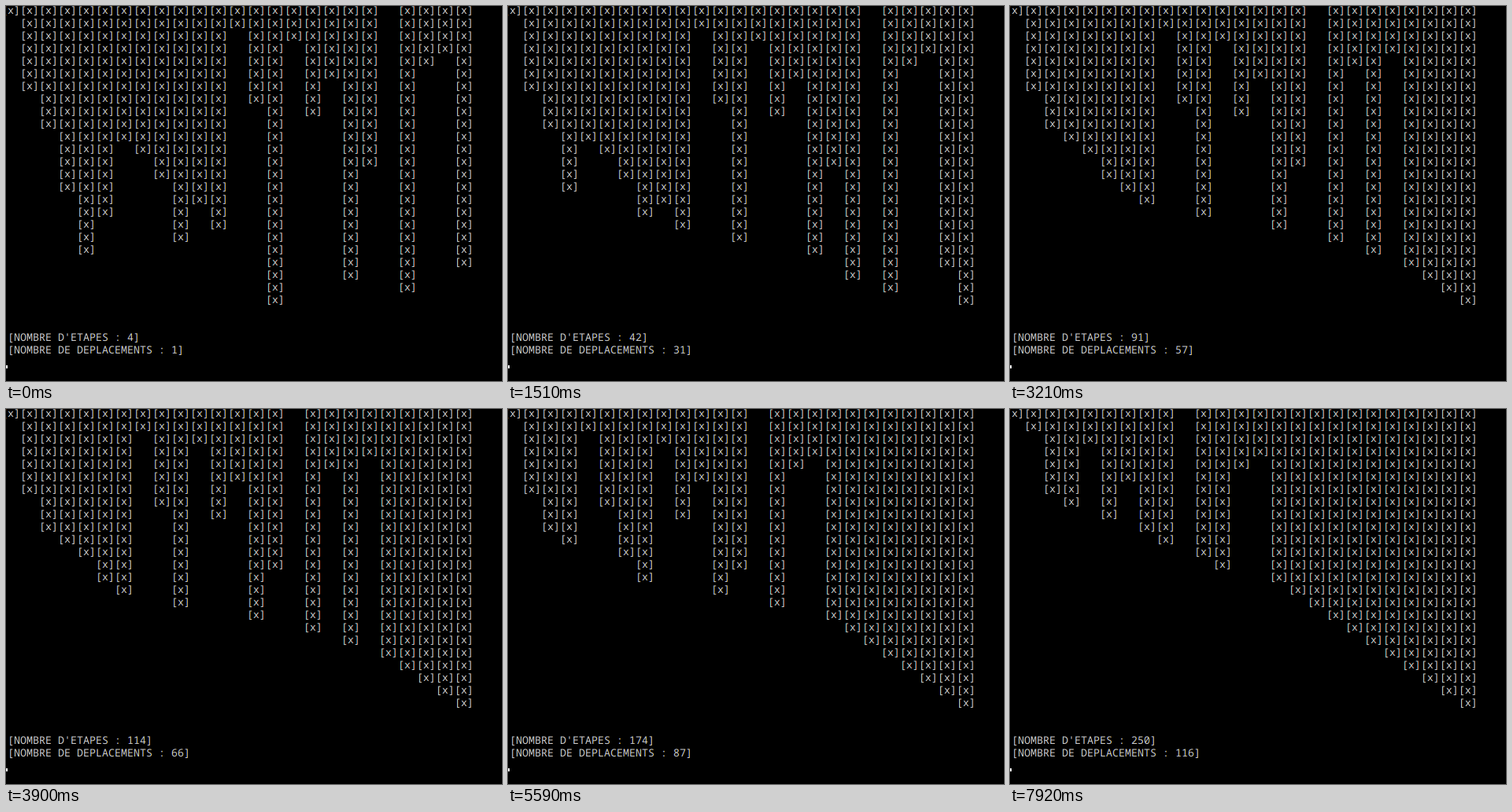
Recreate the animation shown at these times as an HTML page with a canvas. Size 630x477 px, loop 8000 ms.

```html
<!DOCTYPE html>
<html lang="fr">
<head>
<meta charset="utf-8">
<style>
html, body { margin: 0; width: 100%; height: 100%; overflow: hidden; background: #000; }
canvas { display: block; }
</style>
</head>
<body>
<canvas id="stage" width="630" height="477"></canvas>
<script>
const ctx = document.getElementById('stage').getContext('2d', { alpha: false });
const LOOP = 8000, LEFT = -6, LINE = 16, BASELINE = 10;

const start = [1, 7, 10, 20, 15, 17, 11, 12, 14, 19, 16, 18, 2,
               8, 24, 3, 9, 6, 22, 13, 0, 23, 5, 4, 21];

// Pace of the sort: [time in ms, swaps done]
const pace = [[0, 1], [1510, 31], [2510, 48], [3900, 66], [5590, 87], [6970, 103], [7920, 116], [LOOP, 116]];

// Each colour channel is offset by a third of a pixel, as on an LCD
const channels = [['#c00', 1 / 3], ['#0c0', 0], ['#00c', -1 / 3]];

// Bubble sort, keeping the state after every swap
function sortStates(values) {
  const bars = [...values], states = [];
  let steps = 0;
  for (let pass = 1; pass < bars.length; pass++) {
    for (let i = 0; i < bars.length - 1; i++) {
      steps++;
      if (bars[i] > bars[i + 1]) {
        [bars[i], bars[i + 1]] = [bars[i + 1], bars[i]];
        states.push({ bars: [...bars], steps });
      }
    }
  }
  return states;
}

function swapsAt(time) {
  const next = pace.findIndex(([end]) => time < end);
  const [t0, n0] = pace[next - 1], [t1, n1] = pace[next];
  return Math.floor(n0 + (n1 - n0) * (time - t0) / (t1 - t0));
}

const states = sortStates(start);
const tallest = Math.max(...start);

function draw(time) {
  const swaps = swapsAt(time);
  const { bars, steps } = states[swaps - 1];
  const lines = Array.from({ length: tallest }, (_, row) =>
    bars.map(height => height > row ? '[x]' : '   ').join(''));
  lines.push('', '', ` [NOMBRE D'ETAPES : ${steps}]`, ` [NOMBRE DE DEPLACEMENTS : ${swaps}]`);

  ctx.globalCompositeOperation = 'source-over';
  ctx.fillStyle = '#000';
  ctx.fillRect(0, 0, 630, 477);
  ctx.fillStyle = '#fff';
  ctx.fillRect(0, 457, 2, 4);

  ctx.globalCompositeOperation = 'lighter';
  ctx.font = '13.333px "Noto Sans Mono", monospace';
  ctx.textRendering = 'geometricPrecision';
  for (const [color, shift] of channels) {
    ctx.fillStyle = color;
    lines.forEach((line, row) => ctx.fillText(line, LEFT + shift, row * LINE + BASELINE));
  }
}

const origin = performance.now();
function tick() {
  draw((performance.now() - origin) % LOOP);
  requestAnimationFrame(tick);
}
tick();
</script>
</body>
</html>
```
